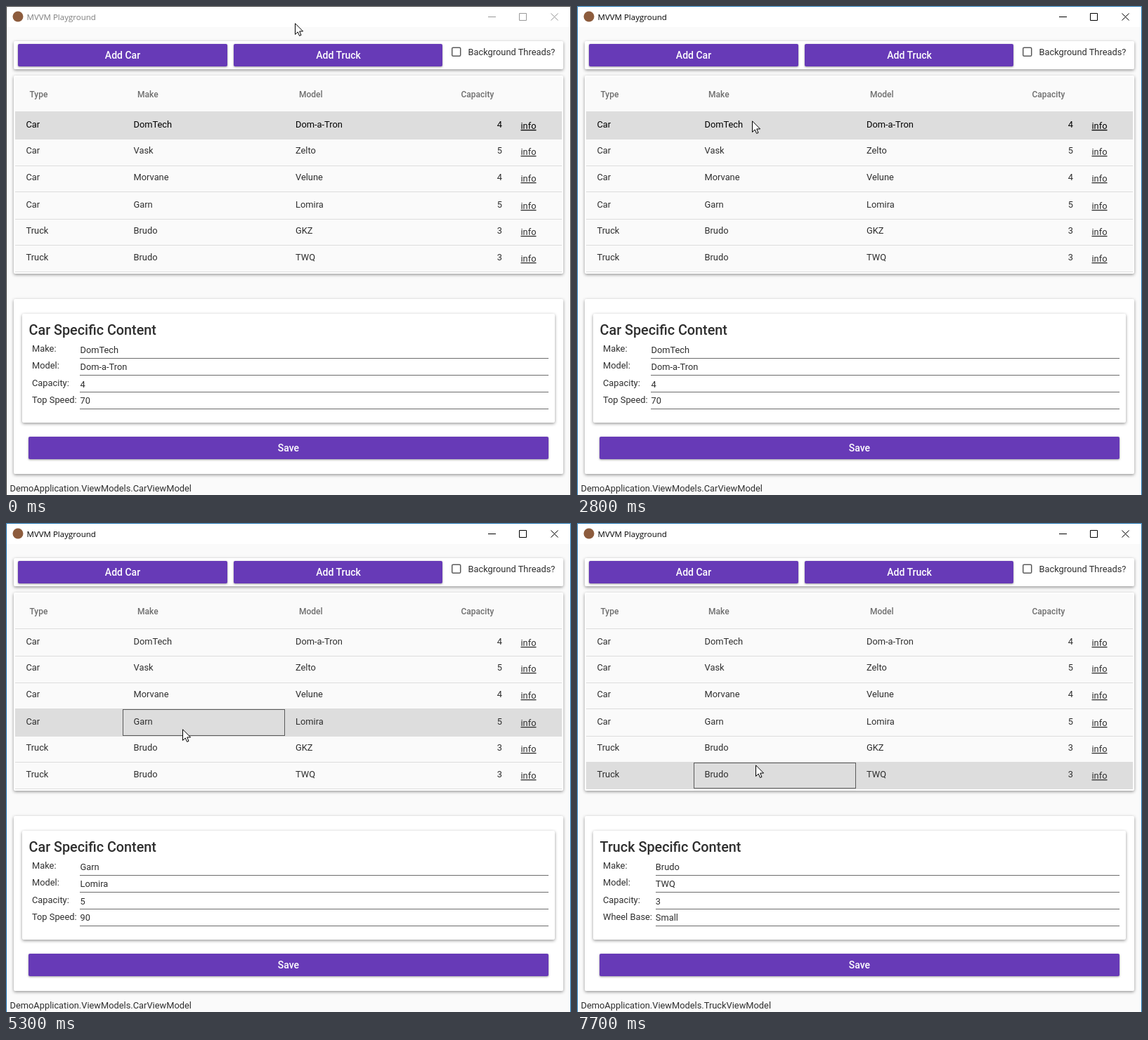
Animation of 804 by 696 pixels, one loop 8000 ms. Source, as an HTML page:

```html
<!DOCTYPE html>
<html lang="en">
<head>
<meta charset="utf-8">
<title>MVVM Playground</title>
<style>
  html, body { margin: 0; width: 100%; height: 100%; overflow: hidden; background: #fafafa; }
  #stage { position: absolute; left: 0; top: 0; width: 804px; height: 696px; overflow: hidden; background: #fafafa; }
  #stage div { position: absolute; }
  .bar { left: 0; top: 0; width: 804px; height: 30px; background: #fff; }
  .card { background: #fff; border-radius: 2px; box-shadow: 0 1.5px 4px rgba(0, 0, 0, .42); }
  .button { background: #673ab7; border-radius: 2px; box-shadow: 0 1px 3px rgba(0, 0, 0, .38); }
  svg { position: absolute; left: 0; top: 0; }
  text { font: 12.85px Roboto, sans-serif; fill: #2e2e2e; white-space: pre; }
  .caption { font: 11.5px "Open Sans", sans-serif; fill: inherit; }
  .head { font-size: 12px; font-weight: 500; fill: #6e6e6e; }
  .action { font-size: 14px; font-weight: 500; fill: #fff; text-anchor: middle; }
  .heading { font-size: 19.8px; font-weight: 500; }
  .num { text-anchor: end; }
  .link { text-decoration: underline; }
  .strong text { fill: #000; }
</style>
</head>
<body>
<div id="stage">
  <div class="bar"></div>
  <svg id="view" width="804" height="696" viewBox="0 0 804 696"></svg>
</div>
<script>
const LOOP = 8000;
const stage = document.getElementById('stage');
const view = document.getElementById('view');

const vehicles = [
  ['Car', 'DomTech', 'Dom-a-Tron', 4, '70'],
  ['Car', 'Vask', 'Zelto', 5, '70'],
  ['Car', 'Morvane', 'Velune', 4, '80'],
  ['Car', 'Garn', 'Lomira', 5, '90'],
  ['Truck', 'Brudo', 'GKZ', 3, 'Large'],
  ['Truck', 'Brudo', 'TWQ', 3, 'Small']
];
const lines = [150, 189, 227, 264, 303, 340, 378];
const baselines = [173, 210, 248, 287, 324, 362];

// When each row is clicked
const clicks = [0, 3200, 4200, 5300, 6000, 7700];

// Pointer runs: start time, then one x, y pair per 100 ms
const runs = [
  [0, 411, 24],
  [800, 400, 62, 382, 116, 364, 163, 334, 186, 325, 190, 372, 178, 452, 163, 540, 152, 610, 145],
  [1700, 630, 121, 640, 95, 640, 71, 632, 56, 602, 58, 560, 62, 510, 68, 460, 76, 418, 85],
  [2600, 345, 113, 285, 143, 249, 163, 247, 187, 249, 203],
  [3400, 249, 214, 249, 232, 249, 245],
  [4500, 250, 254, 250, 268, 251, 284, 251, 293],
  [5600, 252, 300, 253, 309, 254, 316],
  [7400, 254, 334, 254, 344]
];

function add(tag, attrs, parent = view) {
  const el = document.createElementNS('http://www.w3.org/2000/svg', tag);
  for (const key in attrs) el.setAttribute(key, attrs[key]);
  parent.appendChild(el);
  return el;
}

function label(x, y, str, cls = '', parent = view) {
  const el = add('text', { x, y, class: cls }, parent);
  el.textContent = str;
  return el;
}

function box(cls, x, y, w, h) {
  const el = document.createElement('div');
  el.className = cls;
  el.style.cssText = `left:${x}px;top:${y}px;width:${w}px;height:${h}px`;
  stage.insertBefore(el, view);
}

// Cards and buttons
box('card', 11, 50, 782, 40);
box('card', 11, 99, 782, 282);
box('card', 11, 417, 782, 249);
box('card', 23, 438, 758, 155);
box('button', 17, 54, 298, 32);
box('button', 324, 54, 297, 32);
box('button', 32, 613, 740, 32);
label(166, 75, 'Add Car', 'action');
label(473, 75, 'Add Truck', 'action');
label(402, 634, 'Save', 'action');
add('rect', { x: 634.75, y: 59.25, width: 12, height: 12, rx: 1.5, fill: 'none', stroke: '#5c5c5c', 'stroke-width': 1.5 });
label(657.5, 70, 'Background Threads?');

// Title bar
add('circle', { cx: 17, cy: 15, r: 7.5, fill: '#8d5c3d' });
const caption = add('g', {});
label(29.5, 19.5, 'MVVM Playground', 'caption', caption);
const controls = add('path', {
  d: 'M686 15.5H697M730.5 10.5H740.5V20.5H730.5ZM775.5 10.5L785.5 20.5M785.5 10.5L775.5 20.5',
  fill: 'none'
});
const frame = add('path', { d: 'M.5 696V.5H803.5V696', fill: 'none' });

// Table
add('rect', { x: 13, y: 101, width: 778, height: 278, fill: '#fafafa' });
[[33.5, 'Type'], [187, 'Make'], [417, 'Model'], [647.5, 'Capacity']]
  .forEach(([x, str]) => label(x, 130, str, 'head'));
lines.forEach(y => add('rect', { x: 13, y, width: 778, height: 1, fill: '#dddddd' }));

const rows = vehicles.map(([type, make, model, seats], i) => {
  const g = add('g', {});
  const y = lines[i] + 1, h = lines[i + 1] - y, base = baselines[i];
  const back = add('rect', { x: 13, y, width: 778, height: h }, g);
  const focus = add('rect', { x: 166.5, y: y + .5, width: 230, height: h - 1, fill: 'none', stroke: '#5a5a5a' }, g);
  label(28.5, base, type, '', g);
  label(181.5, base, make, '', g);
  label(412, base, model, '', g);
  label(706, base, seats, 'num', g);
  label(732.5, base + 2, 'info', 'link', g);
  return { g, back, focus };
});

// Details
const heading = label(32.5, 468, '', 'heading');
const fields = ['Make:', 'Model:', 'Capacity:', ''].map((name, i) => ({
  name: label(37, [492, 516, 541, 565][i], name),
  value: label(0, [494, 518, 543, 566][i], ''),
  rule: add('rect', { y: 501 + 24 * i, height: 1, fill: '#6c6c6c' })
}));
const status = label(5.5, 691, '');

const pointer = add('path', {
  d: 'M.5 .8V16.5L4.2 13L6.6 18.4L9 17.4L6.7 12H11.6Z',
  fill: '#fff', stroke: '#000', 'stroke-linejoin': 'round'
});

function pointerAt(t) {
  const [start, ...path] = runs.filter(run => run[0] <= t).pop();
  const i = Math.min(Math.floor((t - start) / 100), path.length / 2 - 1);
  return [path[2 * i], path[2 * i + 1]];
}

function showDetails(selected) {
  const [type, ...values] = vehicles[selected];
  const left = type === 'Car' ? 105 : 112;
  heading.textContent = type + ' Specific Content';
  status.textContent = `DemoApplication.ViewModels.${type}ViewModel`;
  fields[3].name.textContent = type === 'Car' ? 'Top Speed:' : 'Wheel Base:';
  fields.forEach(({ value, rule }, i) => {
    value.textContent = values[i];
    value.setAttribute('x', left + (type === 'Car' ? .5 : -.2));
    rule.setAttribute('x', left);
    rule.setAttribute('width', 772 - left);
  });
}

let shown = -1;

function draw(t) {
  const active = t >= 300;
  caption.setAttribute('fill', active ? '#000' : '#7d7d7d');
  controls.setAttribute('stroke', active ? '#000' : '#999');
  frame.setAttribute('stroke', active ? '#1a6fae' : '#3c3c3c');

  const [x, y] = pointerAt(t);
  pointer.setAttribute('transform', `translate(${x} ${y})`);

  const selected = clicks.filter(c => c <= t).length - 1;
  rows.forEach(({ g, back, focus }, i) => {
    const hover = t >= 2600 && y > lines[i] && y <= lines[i + 1];
    const on = i === selected;
    back.setAttribute('fill', on ? '#dddddd' : hover ? '#ebebeb' : '#fafafa');
    focus.setAttribute('visibility', on && i > 0 ? 'visible' : 'hidden');
    g.setAttribute('class', on && i === 0 ? 'strong' : '');
  });

  if (selected !== shown) {
    shown = selected;
    showDetails(selected);
  }
}

const begin = performance.now();
function tick() {
  draw((performance.now() - begin) % LOOP);
  requestAnimationFrame(tick);
}
tick();
</script>
</body>
</html>
```
